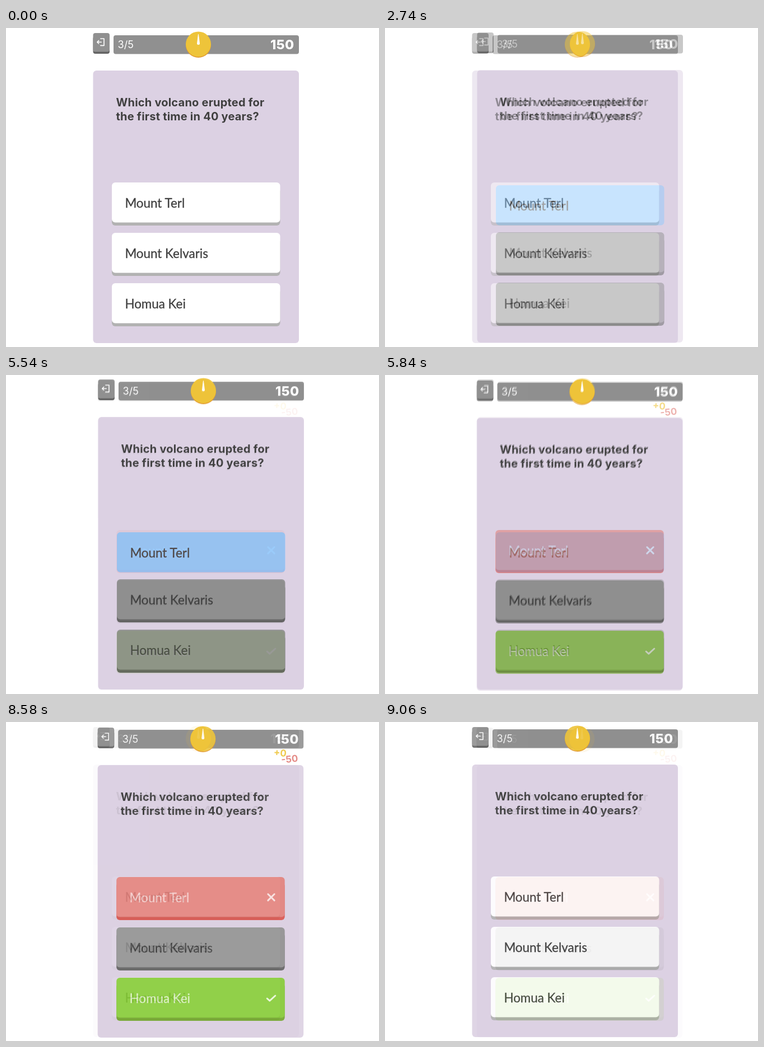
These frames come from a looping animation (666x570 px, 9.12 s). An HTML page:

```html
<!DOCTYPE html>
<html lang="en">
<head>
<meta charset="utf-8">
<title>Quiz card</title>
<style>
  html, body { margin: 0; width: 100%; height: 100%; overflow: hidden; background: #fff; }
  svg { display: block; width: 666px; height: 570px; }
  text { font-family: Inter, "Open Sans", sans-serif; }

  .question { font-size: 20px; font-weight: 700; letter-spacing: .22px; fill: #3f3f3f; }
  .count { font-size: 18px; fill: #fff; }
  .score { font-size: 23.5px; font-weight: 800; letter-spacing: .3px; fill: #fff; text-anchor: end; }
  .points { font-size: 17px; font-weight: 700; }
  .label {
    font-family: Lato, "Open Sans", sans-serif; font-size: 22.4px;
    fill: var(--text, #3f3f3f); stroke: var(--text, #3f3f3f); stroke-width: .3px;
  }
  .face { fill: var(--face); }
  .edge { fill: var(--edge); }
  .line { fill: none; stroke-linecap: round; stroke-linejoin: round; }

  .plain { --face: #fff; --edge: #b2b2b2; }
  .off { --face: #909090; --edge: #646464; }
  .picked { --face: #90c9fd; --edge: none; }
  .wrong { --face: #e2807b; --edge: #db554f; --text: #f4cbc9; }
  .right { --face: #85cb35; --edge: #73a82c; --text: #daf0c0; }

  /* Dissolves advance in 60 ms steps */
  #chosen { opacity: 0; animation: chosen 9120ms linear infinite; }
  #result { opacity: 0; animation: result 9120ms linear infinite; }
  @keyframes chosen {
    0% { opacity: 0; }
    27.411% { opacity: 0; animation-timing-function: steps(10, start); }
    33.99%, 76% { opacity: 1; animation-timing-function: step-end; }
    76.01%, 100% { opacity: 0; }
  }
  @keyframes result {
    0% { opacity: 0; }
    60.745% { opacity: 0; animation-timing-function: steps(10, start); }
    67.323% { opacity: 1; }
    94.078% { opacity: 1; animation-timing-function: steps(9, start); }
    100% { opacity: .1; }
  }
</style>
</head>
<body>
<svg viewBox="0 0 666 570">
  <defs>
    <rect id="paper" width="666" height="570" fill="#fff"/>

    <g id="board">
      <rect x="155.5" y="15" width="29.5" height="31" rx="4" fill="#646464"/>
      <rect x="155.5" y="9" width="29.5" height="33.5" rx="4" fill="#909090"/>
      <path class="line" stroke="#fff" stroke-width="1.6" d="M168.8 19h6.2v12.4h-6.2M170.2 25.2h-7.4m2.8-2.8l-2.8 2.8 2.8 2.8"/>

      <rect x="192" y="13" width="331" height="33.5" rx="4" fill="#909090"/>
      <text class="count" x="199.6" y="36.2">3/5</text>
      <text class="score" x="514.5" y="37.5">150</text>

      <circle cx="343.5" cy="30.5" r="22.5" fill="#e0982f"/>
      <circle cx="343.5" cy="28.9" r="22.5" fill="#eec43a"/>
      <path fill="#fff" d="M343 11h.9l2.1 16.5a2.5 2.5 0 0 1-5 0z"/>

      <rect x="155.5" y="76" width="367.5" height="487" rx="6" fill="#dcd1e3"/>
      <text class="question" x="196.5" y="140">Which volcano erupted for</text>
      <text class="question" x="196.5" y="165">the first time in 40 years?</text>
    </g>

    <g id="key">
      <rect class="edge" x="189" y="286" width="300.5" height="67" rx="6"/>
      <rect class="face" x="189" y="276" width="300.5" height="71.4" rx="6"/>
    </g>
    <g id="a"><use href="#key"/><text class="label" x="212.4" y="320.7">Mount Terl</text></g>
    <g id="b"><use href="#key"/><text class="label" x="212.4" y="320.7">Mount Kelvaris</text></g>
    <g id="c"><use href="#key"/><text class="label" x="212.4" y="320.7">Homua Kei</text></g>
  </defs>

  <g id="asked">
    <use href="#paper"/>
    <use href="#board"/>
    <use href="#a" class="plain"/>
    <use href="#b" class="plain" y="90"/>
    <use href="#c" class="plain" y="180"/>
  </g>

  <g id="chosen">
    <use href="#paper"/>
    <g transform="translate(9 -1)">
      <use href="#board"/>
      <use href="#a" class="picked" y="6"/>
      <use href="#b" class="off" y="90"/>
      <use href="#c" class="off" y="180"/>
    </g>
  </g>

  <g id="result">
    <use href="#paper"/>
    <g transform="translate(8.2 1)">
      <use href="#board"/>
      <use href="#a" class="wrong"/>
      <use href="#b" class="off" y="90"/>
      <use href="#c" class="right" y="180"/>
    </g>
    <path class="line" stroke="#f8dfde" stroke-width="3" d="M467.8 307.5l11.4 11.4m0-11.4l-11.4 11.4"/>
    <path class="line" stroke="#e8f6d8" stroke-width="3" d="M466.2 494l4.6 4.2 10-9.2"/>
    <text class="points" fill="#eec43a" transform="translate(477.5 60.5) rotate(4)">+0</text>
    <text class="points" fill="#e2807b" transform="translate(492 73.8) rotate(-6)">-50</text>
  </g>
</svg>
</body>
</html>
```
